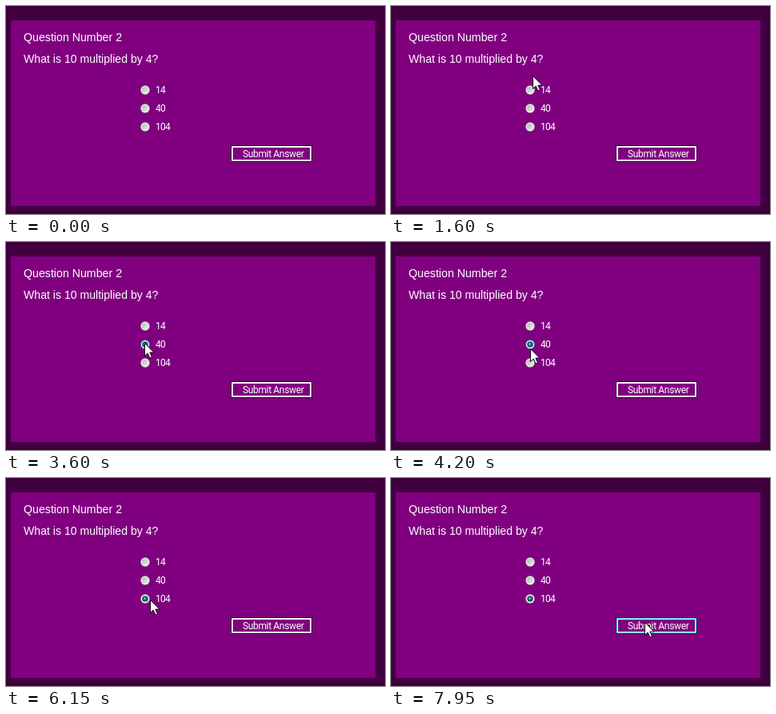
Recreate the animation shown at these times as an HTML page with a canvas. Size 474 px wide and 260 px high, loop 8000 ms.

```html
<!DOCTYPE html>
<html lang="en">
<head>
<meta charset="utf-8">
<title>Quiz question</title>
<style>
  html, body { margin: 0; width: 100%; height: 100%; overflow: hidden; background: #400040; }
  canvas { display: block; }
</style>
</head>
<body>
<canvas id="stage" width="474" height="260"></canvas>
<script>
const ctx = document.getElementById('stage').getContext('2d');
const LOOP = 8000, STEP = 50, ENTER = 550;
const HEADING = '"Liberation Sans", Arial, sans-serif';
const CONTROL = 'Roboto, "Liberation Sans", sans-serif';
const PURPLE = '#800080';

const answers = ['14', '40', '104'];
const RADIO_X = 174;
const radioY = i => 105 + 23 * i;
const clickTimes = [2150, 3500, 5250]; // the answers are picked in order

// The pointer rests between moves and eases through each one.
const entry = { x: 404, y: 198 };
const moves = [
  { from: 500, to: 800, x: 179, y: 57 },    // question text
  { from: 1000, to: 1950, x: 177, y: 100 }, // first answer
  { from: 2450, to: 3250, x: 180, y: 136 }, // down past the second
  { from: 3250, to: 3550, x: 174, y: 126 }, // second answer
  { from: 3750, to: 4950, x: 177, y: 147 }, // third answer
  { from: 5700, to: 6150, x: 181, y: 152 },
  { from: 6500, to: 7100, x: 326, y: 179 }, // submit button
  { from: 7200, to: 7950, x: 318, y: 180 }
];

const ease = k => k * k * (3 - 2 * k);

function pointerAt(t) {
  if (t < ENTER) return null;
  let { x, y } = entry;
  for (const move of moves) {
    const k = ease(Math.min(1, Math.max(0, (t - move.from) / (move.to - move.from))));
    x += (move.x - x) * k;
    y += (move.y - y) * k;
  }
  return { x: Math.round(x), y: Math.round(y) };
}

function text(str, x, y, size, font, spacing = 0) {
  ctx.font = `${size}px ${font}`;
  ctx.letterSpacing = `${spacing}px`;
  ctx.fillStyle = '#fff';
  ctx.fillText(str, x, y);
}

function disc(x, y, r, fill) {
  ctx.fillStyle = fill;
  ctx.beginPath();
  ctx.arc(x, y, r, 0, Math.PI * 2);
  ctx.fill();
}

function box(x, y, w, h, r, fill) {
  ctx.fillStyle = fill;
  ctx.beginPath();
  ctx.roundRect(x, y, w, h, r);
  ctx.fill();
}

function drawRadio(y, selected, hover) {
  const face = ctx.createLinearGradient(RADIO_X - 4, y - 4, RADIO_X + 4, y + 4);
  face.addColorStop(0, hover ? '#8fd4ef' : '#b4b4b4');
  face.addColorStop(1, hover ? '#e4f8ff' : '#eeeeea');
  disc(RADIO_X, y, 6, hover ? '#28607f' : '#858085');
  disc(RADIO_X, y, 5.2, hover ? '#d5f3fc' : '#f4f4f4');
  disc(RADIO_X, y, 4, face);
  if (selected) {
    disc(RADIO_X, y, 3.6, '#12384f');
    disc(RADIO_X, y, 2.4, '#1f7796');
    disc(RADIO_X - 0.6, y - 0.6, 1.1, '#86d5e6');
  }
}

function drawButton(hover) {
  box(281, 174, 102, 21, 2, hover ? '#12303f' : '#220022');
  box(282, 175, 100, 19, 1, hover ? '#62d8ee' : '#fff');
  if (hover) box(283, 176, 98, 17, 0, '#d4f5fa');
  box(284, 177, 96, 15, 0, PURPLE);
  text('Submit Answer', 296, 189, 12, CONTROL, -0.35);
}

function drawPointer({ x, y }) {
  const shape = [[0, 0], [0, 16], [3.7, 12.6], [6.4, 18.6], [9, 17.5], [6.4, 11.6], [11.4, 11.6]];
  ctx.beginPath();
  shape.forEach(([dx, dy]) => ctx.lineTo(x + dx - 0.5, y + dy + 0.5));
  ctx.closePath();
  ctx.fillStyle = '#fff';
  ctx.fill();
  ctx.strokeStyle = '#180018';
  ctx.lineWidth = 1;
  ctx.stroke();
}

function inside(p, x, y, w, h) {
  return p !== null && p.x >= x && p.x <= x + w && p.y >= y && p.y <= y + h;
}

function draw(t) {
  const pointer = pointerAt(t);
  const selected = clickTimes.filter(at => t >= at).length - 1;
  ctx.fillStyle = '#400040';
  ctx.fillRect(0, 0, 474, 260);
  ctx.fillStyle = PURPLE;
  ctx.fillRect(6, 18, 456, 232);

  text('Question Number 2', 22, 44, 14.2, HEADING);
  text('What is 10 multiplied by 4?', 22, 71, 14.1, HEADING);
  answers.forEach((label, i) => {
    const y = radioY(i);
    drawRadio(y, i === selected, inside(pointer, RADIO_X - 7, y - 7, 13, 14));
    text(label, 187, y + 4, 12, CONTROL, -0.7);
  });
  drawButton(inside(pointer, 281, 174, 102, 21));
  if (pointer) drawPointer(pointer);
}

function frame() {
  const t = performance.now() % LOOP;
  draw(Math.floor(t / STEP) * STEP);
  requestAnimationFrame(frame);
}
frame();
</script>
</body>
</html>
```
